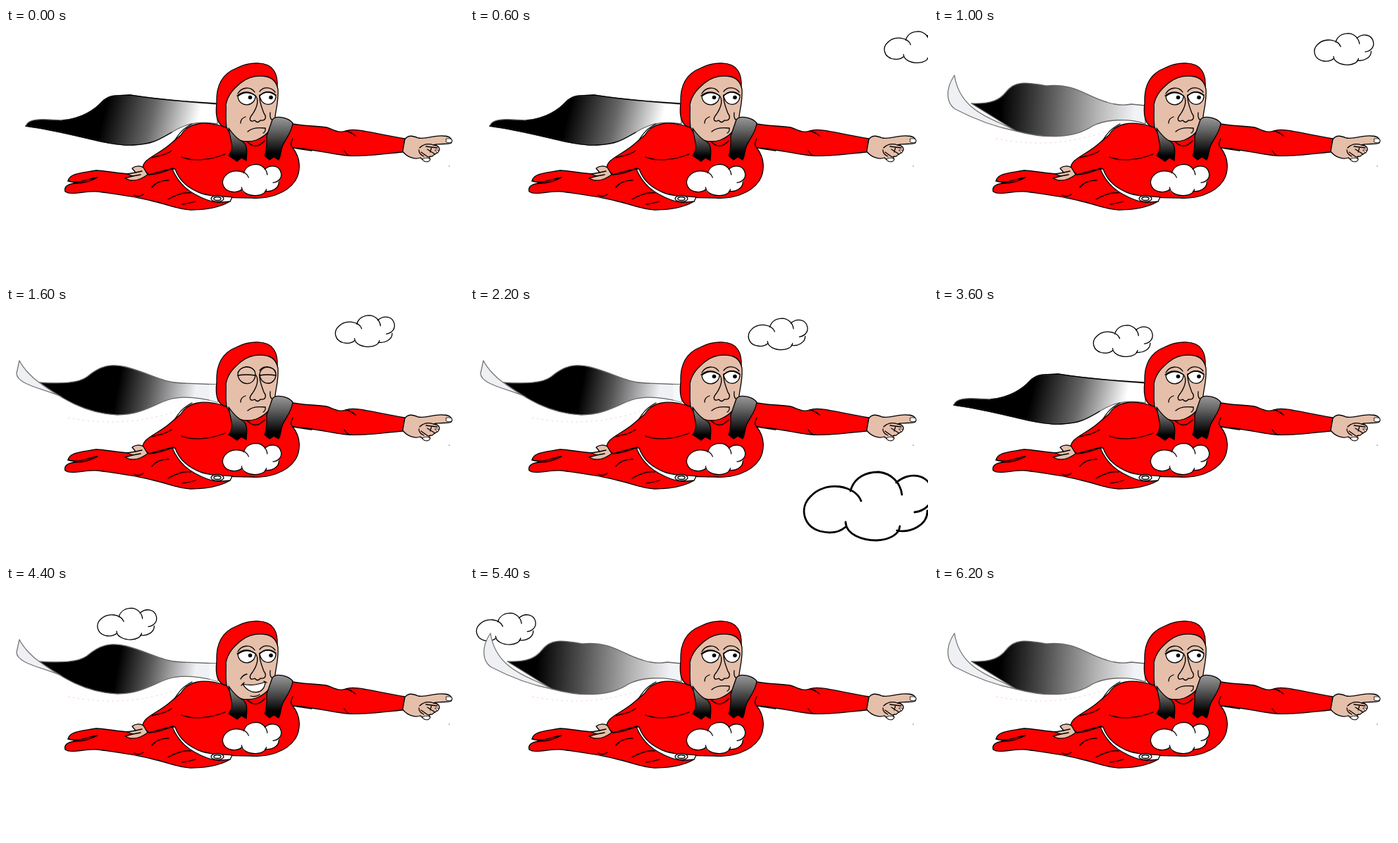
Write an HTML page that moves like this. It is 650 by 356 pixels and loops after 6400 ms.

```html
<!DOCTYPE html>
<html lang="en">
<head>
<meta charset="utf-8">
<title>Flying hero</title>
<style>
html, body { margin: 0; width: 100%; height: 100%; overflow: hidden; background: #fff; }
svg { display: block; width: 100%; height: 100%; }
.ink { fill: none; stroke: #000; stroke-width: 1.3; stroke-linecap: round; stroke-linejoin: round; }
.red { fill: #fe0000; }
.skin { fill: #e5bfaa; }
.white { fill: #fff; }
.pale { fill: #eef0f4; stroke: #777; }
.edge { stroke: #666; }
</style>
</head>
<body>
<svg viewBox="0 0 650 356">
  <defs>
    <linearGradient id="capeA" gradientUnits="userSpaceOnUse" x1="140" y1="118" x2="268" y2="150">
      <stop/><stop offset=".5" stop-color="#666"/><stop offset="1" stop-color="#fff"/>
    </linearGradient>
    <linearGradient id="capeB" gradientUnits="userSpaceOnUse" x1="95" y1="110" x2="285" y2="122">
      <stop/><stop offset=".35" stop-color="#555"/><stop offset=".72" stop-color="#b5b5b5"/><stop offset="1" stop-color="#f2f3f6"/>
    </linearGradient>
    <linearGradient id="capeC" gradientUnits="userSpaceOnUse" x1="160" y1="105" x2="268" y2="125">
      <stop/><stop offset=".4" stop-color="#555"/><stop offset="1" stop-color="#f0f1f4"/>
    </linearGradient>
    <linearGradient id="strap" x2="0" y2="1">
      <stop stop-color="#999"/><stop offset=".3" stop-color="#666"/><stop offset=".85"/>
    </linearGradient>
    <g id="cloud" class="ink" stroke-width="2.8" style="stroke-width:2.8">
      <path class="white" stroke="none" style="stroke:none" d="M67 28C72 8 90 1 107 1C117 2 126 7 132 16C150 1 178 4 183 28C185 38 178 48 175 55C177 70 160 86 133 83C130 94 118 97 104 98C80 97 64 89 60 80C48 87 25 89 10 76C-4 62 -1 44 14 32C28 20 50 20 67 28Z"/>
      <path d="M82 42C74 20 32 12 10 36C-6 52 0 78 24 85C40 89 52 86 60 79M60 72C61 90 84 98 104 98C122 97 136 90 137 78M133 84C152 88 177 76 176 56M132 16C150 0 178 3 183 28C186 44 174 56 158 58M67 28C72 8 90 1 107 1C126 3 138 17 140 33"/>
    </g>
  </defs>

  <use id="small" href="#cloud"/>

  <g class="cape">
    <path class="ink edge" style="fill:url(#capeA)" d="M28 139C32 126 58 130 80 131C107 129 126 116 136 105C147 93 162 96 176 95C207 100 245 104 300 108L300 136C268 130 250 139 235 148C215 160 205 165 180 166C145 168 95 148 28 139Z"/>
    <path class="ink" d="M80 131C107 129 126 116 136 105C147 93 162 96 176 95C207 100 245 104 298 107M28 139C95 148 145 168 180 166C205 165 215 160 235 148"/>
  </g>
  <g class="cape">
    <path class="ink edge" style="fill:url(#capeC)" d="M47 107C80 109 103 108 115 99C134 83 149 80 170 85C205 94 220 107 250 108L300 110V135C270 127 247 126 229 132C207 140 190 153 158 153C112 151 80 130 47 107Z"/>
    <path class="ink pale" d="M19 76C25 88 38 101 47 107C58 115 68 122 78 127C54 116 15 110 15 94Z"/>
    <path fill="#f7f8fa" d="M288 110H300V135L289 132Z"/>
  </g>
  <g class="cape">
    <path class="ink edge" style="fill:url(#capeB)" d="M53 107C83 108 94 101 102 91C115 74 131 77 160 82C200 78 216 97 245 105C260 110 270 110 280 108L300 110V136C275 127 242 130 225 139C200 156 160 158 116 146Z"/>
    <path class="ink pale" d="M29 67C15 88 18 107 30 115C55 128 85 140 116 146C85 128 37 120 29 67Z"/>
  </g>
  <path id="specks" fill="none" stroke="#f7c9cb" stroke-dasharray="2 5" d="M88 157C150 169 205 164 275 136"/>

  <!-- legs and torso -->
  <g class="ink">
    <path class="red" d="M88 217C90 206 106 206 128 202C143 202 160 208 197 208C215 204 230 200 240 200L320 238L318 246C306 253 287 258 262 258C242 257 230 250 210 246C180 238 150 235 130 232C110 231 93 238 84 232C82 225 87 221 101 220Z"/>
    <path d="M88 217C105 221 112 215 129 212M101 220C113 220 121 216 130 212M182 237Q188 241 195 236M207 226C213 218 221 216 231 216M230 243Q250 232 262 234M250 250Q259 249 269 246"/>
    <path class="red" d="M248 152C257 136 278 131 306 139L332 148L372 150L398 134C420 140 438 138 455 141C463 143 472 150 482 146C495 141 518 149 566 157L563 176C540 178 510 183 485 181C465 180 441 172 407 170C418 184 419 202 411 216C398 236 370 243 348 241C322 241 288 241 266 230C248 221 242 209 237 199L203 208L194 200C193 185 217 180 235 163Z"/>
    <path d="M237 199C226 204 214 208 203 208M249 183C266 190 291 187 311 179M239 160C246 149 252 142 264 136M235 174C222 183 217 180 207 184M482 146Q489 147 496 153M407 157Q402 166 407 170C418 171 426 174 434 174M480 174Q485 182 490 181"/>
    <path class="white" d="M236 200L240 200C246 217 258 227 278 235C293 240 308 238 321 240L318 246C307 247 299 249 286 244C259 234 245 221 236 200Z"/>
    <ellipse class="white" cx="300" cy="242" rx="9" ry="4.5"/>
    <ellipse cx="300" cy="242" rx="5" ry="2.5"/>
    <path class="skin" d="M179 199C184 195 191 195 195 198L201 208C194 213 187 217 176 216L169 213L180 210L172 207L184 205Z"/>
    <path d="M180 210L191 208M184 205L193 203"/>
  </g>
  <use href="#cloud" transform="translate(307 193) scale(.456)"/>

  <!-- pointing hand -->
  <g class="ink">
    <path class="skin" d="M566 158C571 151 578 153 585 156C597 158 607 152 620 153C630 153 635 158 632 163C626 166 616 163 607 166C615 167 618 172 612 177L607 180C605 184 602 181 600 183C605 187 599 191 594 189L588 184C580 187 569 183 563 175Z"/>
    <path d="M607 166C598 163 591 166 587 170M612 170L596 168M609 179L598 172M599 183L589 176M586 173Q586 179 593 182M604 169L602 176"/>
    <path class="white" stroke-width=".8" d="M625 157Q634 156 633 161Q630 164 625 162ZM609 173Q616 172 613 177ZM592 185Q600 183 602 187Q598 192 592 188Z"/>
  </g>
  <circle cx="629" cy="196" r=".8" fill="#777"/>

  <!-- head -->
  <g class="ink">
    <path class="red" d="M342 159Q355 170 367 160L370 150L340 150Z" stroke="none"/>
    <path class="red" d="M313 141C299 139 297 123 299 106C298 80 309 64 327 57C346 47 372 47 380 60Q386 69 385 84L360 82L325 105Z"/>
    <path class="skin" d="M313 141C311 127 313 113 312 109C315 93 325 85 333 78C344 69 358 67 370 69Q383 72 386 87C387 104 383 115 382 126C380 143 368 154 355 159C339 164 322 160 313 141Z"/>
    <path d="M342 161Q354 174 367 160M329 93C334 84 347 82 353 91M360 90C366 82 377 84 382 91M355 97C360 106 354 116 350 122C343 130 347 134 353 131Q357 136 361 131C369 132 370 126 366 121M360 95C359 104 363 113 366 121M375 120Q374 127 377 130"/>
    <path style="fill:url(#strap)" d="M378 130C383 123 401 127 407 135C405 149 397 157 393 166C389 174 391 180 387 187L380 183L374 187L367 181C371 172 370 164 370 153Z"/>
    <path style="fill:url(#strap)" d="M316 142C322 151 329 158 337 162C343 167 342 177 341 188L334 184L328 189L316 181Q322 174 320 163Z"/>
  </g>

  <g id="eyes" class="ink">
    <path class="white" d="M329 97Q341 87 354 96C354 112 331 114 329 97ZM360 96Q371 86 383 96C383 111 363 114 360 96Z"/>
    <path d="M328 96Q341 86 354 96M360 96Q371 86 383 95"/>
    <g id="pupils" fill="#000" stroke="none"><circle cx="346.5" cy="98.5" r="2.8"/><circle cx="376" cy="98.5" r="2.8"/></g>
  </g>
  <g id="lids" class="ink">
    <path class="skin" d="M329 96C330 82 352 81 354 95C354 113 331 113 329 96ZM360 96C361 81 382 83 383 95C383 112 362 113 360 96Z"/>
    <path d="M329 97Q341 95 354 97M360 97Q371 95 383 97"/>
  </g>
  <path id="frown" class="ink" d="M343 147Q350 140 368 142Q369 147 365 149M333 135Q333 128 340 126"/>
  <g id="smile" class="ink">
    <path class="white" d="M336 139Q350 143 368 136C367 155 345 155 336 139Z"/>
    <path d="M334 141L338 137M366 135L370 137M333 132Q336 126 342 125M347 156Q354 158 360 154"/>
  </g>

  <use id="big" href="#cloud"/>
</svg>
<script>
const STEP = 200, STEPS = 32;
const el = id => document.getElementById(id);
const capes = document.querySelectorAll('.cape');
const show = (node, on) => node.style.display = on ? '' : 'none';
const within = (n, from, to) => n >= from && n <= to;

function draw(n) {
  // cape poses repeat in threes, holding one pose every sixth step
  const pose = Math.floor(5 * (n + 1) / 6) % 3;
  capes.forEach((cape, i) => show(cape, i === pose));
  show(el('specks'), pose > 0);

  el('small').setAttribute('transform',
    `translate(${660 - 24.12 * n} ${.2 + 1.4 * n}) scale(.46)`);
  el('big').setAttribute('transform',
    `translate(${173 - 100 * (n - 14)} ${257 + 8 * (n - 14)})`);

  const blink = n === 8, happy = within(n, 19, 24);
  show(el('eyes'), !blink);
  show(el('lids'), blink);
  show(el('smile'), happy);
  show(el('frown'), !happy);
  el('pupils').setAttribute('transform', `translate(${within(n, 12, 16) ? -5.5 : 0} 0)`);
}

const start = performance.now();
function tick(now) {
  draw(Math.floor(Math.max(0, now - start) / STEP) % STEPS);
  requestAnimationFrame(tick);
}
draw(0);
requestAnimationFrame(tick);
</script>
</body>
</html>
```
